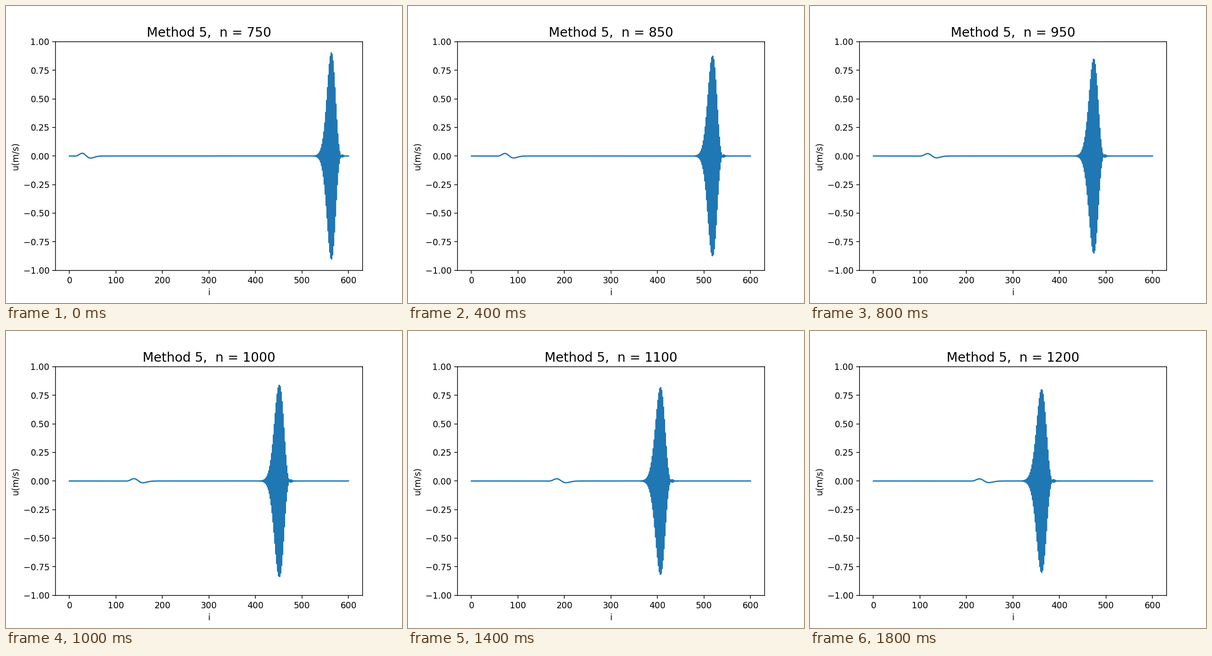
Animation, 864 px wide and 648 px high, one loop 2000 ms. Source, as a matplotlib script:

```python
import numpy as np
import matplotlib.pyplot as plt
from matplotlib.animation import FuncAnimation

CELLS = 600
FIRST_STEP, STEP = 750, 50
FRAMES, INTERVAL = 10, 200

i = np.arange(CELLS + 1)
k = (np.arange(400) + 0.5) * 0.002
sawtooth = np.where(i % 2, 1.0, -1.0)


def pulse(x, n):
    """Gaussian pulse after n steps of diffusion and third-order dispersion."""
    variance = 73 + 0.047 * (n - FIRST_STEP)
    weight = np.exp(-variance * k**2 / 2)
    phase = np.outer(x, k) - 0.06 * n * k**3
    return np.cos(phase) @ weight


def envelope(offset, n):
    """Pulse scaled to its height at step n, with its crest at offset 0."""
    grid = np.linspace(-10, 20, 601)
    values = pulse(grid, n)
    crest = grid[values.argmax()]
    height = 0.903 * (n / FIRST_STEP) ** -0.258
    return height * pulse(offset + crest, n) / values.max()


def velocity(n):
    center = 563.4 - 0.4482 * (n - FIRST_STEP)
    packet = envelope(i - center, n)
    # The weak smooth wave mirrors the packet and follows its slope.
    ripple = 0.33 * np.gradient(packet[::-1])
    return sawtooth * packet + ripple


fig, ax = plt.subplots(figsize=(6.4, 4.8), dpi=135)
line, = ax.plot(i, np.zeros(CELLS + 1))
ax.set_xlim(-30, 630)
ax.set_ylim(-1, 1)
ax.set_xlabel("i")
ax.set_ylabel("u(m/s)")
title = ax.set_title("", fontsize=15)


def update(frame):
    n = FIRST_STEP + STEP * frame
    line.set_ydata(velocity(n))
    title.set_text(f"Method 5,  n = {n}")
    return line, title


anim = FuncAnimation(fig, update, frames=FRAMES, interval=INTERVAL,
                     repeat=True, repeat_delay=0)
plt.show()
```
